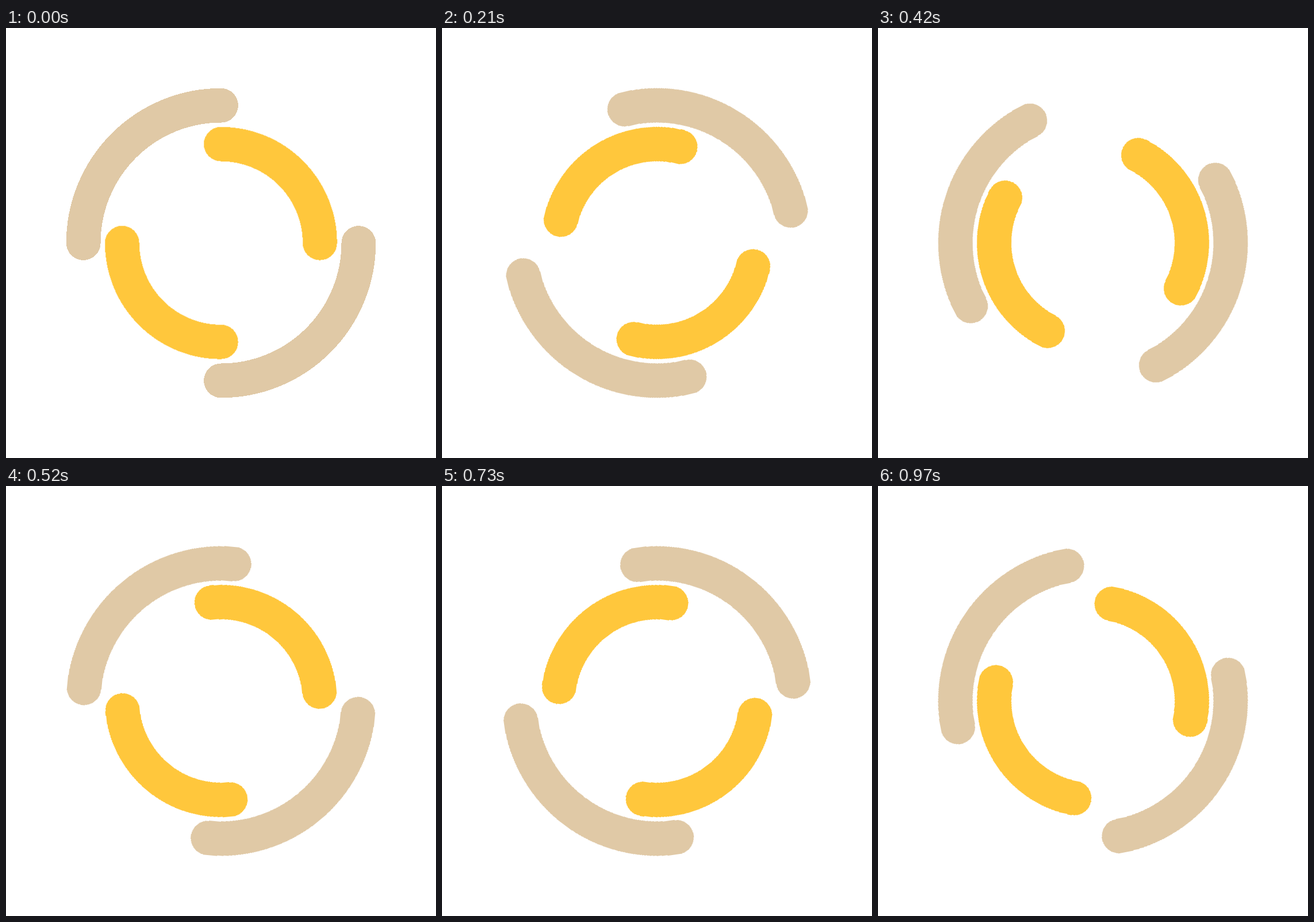
An HTML page without scripts for the animation above (1 s loop, 748 by 748 pixels).

```html
<!DOCTYPE html>
<html lang="en">
<head>
<meta charset="utf-8">
<title>Dual ring loader</title>
<style>
  html, body {
    margin: 0;
    height: 100%;
    overflow: hidden;
    background: #fff;
  }

  svg {
    display: block;
    width: 100%;
    height: 100%;
  }

  .ring {
    --step: calc(360deg / 33);
    fill: none;
    stroke-width: 8;
    stroke-linecap: round;
    shape-rendering: crispEdges;
    transform-origin: 50px 50px;
    /* the small lead keeps each tick clear of rounding */
    animation: spin 1s -1ms infinite;
  }

  .outer { stroke: #e0c9a6; }

  .inner {
    --step: calc(-360deg / 33);
    stroke: #ffc73c;
  }

  /* 33 ticks of 30 ms; the middle one is held for 40 ms */
  @keyframes spin {
    0% {
      transform: rotate(0deg);
      animation-timing-function: steps(16, end);
    }
    48% {
      transform: rotate(calc(var(--step) * 16));
      animation-timing-function: steps(1, end);
    }
    52% {
      transform: rotate(calc(var(--step) * 17));
      animation-timing-function: steps(16, end);
    }
    100% {
      transform: rotate(calc(var(--step) * 33));
    }
  }
</style>
</head>
<body>
<svg viewBox="0 0 100 100">
  <path class="ring outer" d="M82 50A32 32 0 0 1 50 82M18 50A32 32 0 0 1 50 18"/>
  <path class="ring inner" d="M50 73A23 23 0 0 1 27 50M50 27A23 23 0 0 1 73 50"/>
</svg>
</body>
</html>
```
